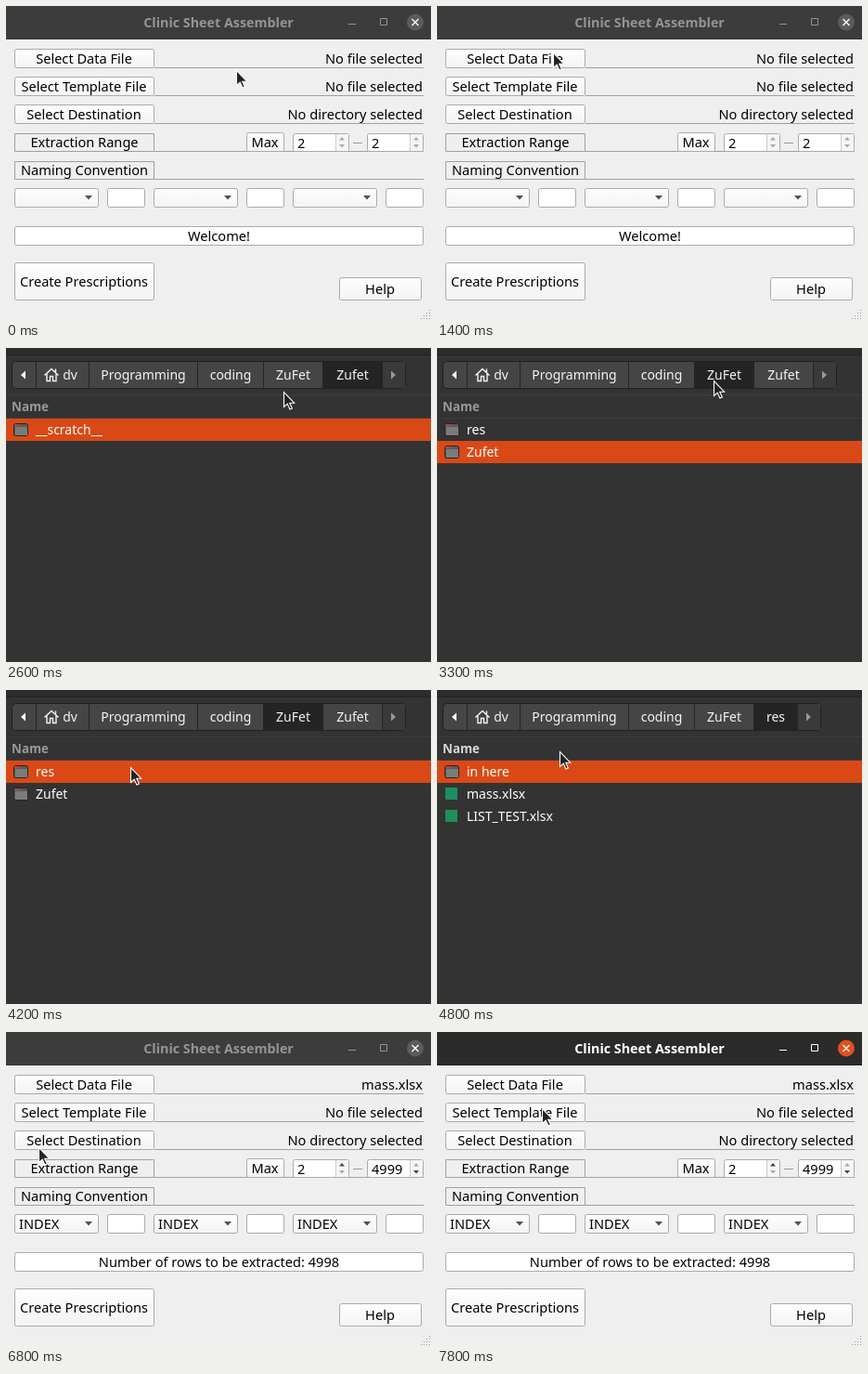
Recreate the animation shown at these times as an HTML page with a canvas. Size 458 px wide and 338 px high, loop 8 s.

```html
<!DOCTYPE html>
<html lang="en">
<head>
<meta charset="utf-8">
<title>File selection</title>
<style>
html, body { margin: 0; width: 100%; height: 100%; overflow: hidden; background: #333; }
canvas { display: block; }
</style>
</head>
<body>
<canvas id="stage" width="458" height="338"></canvas>
<script>
const ctx = document.getElementById('stage').getContext('2d');
const LOOP = 8000, STEP = 100;
const FAMILY = '"Noto Sans", sans-serif';
const UI = '14.6px ' + FAMILY, LIST = '14px ' + FAMILY;

// Pointer positions: [time, x, y]
const PATH = [
  [0, 248, 69], [400, 248, 69], [600, 178, 61], [800, 125, 50], [1500, 125, 50],
  [1600, 130, 51], [1900, 130, 51], [2200, 190, 70], [2500, 300, 56], [2800, 296, 29],
  [3200, 296, 29], [3300, 298, 35], [3700, 132, 82], [3800, 132, 82], [3900, 134, 83],
  [4400, 134, 83], [4800, 132, 66], [5100, 132, 66], [5400, 125, 121], [6400, 35, 124],
  [7000, 35, 124], [7100, 55, 124], [7200, 55, 123], [7300, 90, 98], [7400, 113, 82], [LOOP, 113, 82]
];

function pointerAt(t) {
  const i = PATH.findIndex(p => p[0] > t);
  const [t0, x0, y0] = PATH[i - 1], [t1, x1, y1] = PATH[i];
  const k = (t - t0) / (t1 - t0);
  return [Math.round(x0 + (x1 - x0) * k), Math.round(y0 + (y1 - y0) * k)];
}

function rect(x, y, w, h, color) {
  ctx.fillStyle = color;
  ctx.fillRect(x, y, w, h);
}

function text(str, x, y, color = '#000', align = 'left', font = UI) {
  ctx.font = font;
  ctx.textAlign = align;
  ctx.fillStyle = color;
  ctx.fillText(str, x, y);
}

function box(x, y, w, h, fill, stroke = '#aaa', radius = 2) {
  ctx.beginPath();
  ctx.roundRect(x + .5, y + .5, w, h, radius);
  ctx.fillStyle = fill;
  ctx.fill();
  ctx.lineWidth = 1;
  ctx.strokeStyle = stroke;
  ctx.stroke();
}

function shape(points, fill) {
  ctx.beginPath();
  points.forEach(([x, y]) => ctx.lineTo(x, y));
  ctx.closePath();
  ctx.fillStyle = fill;
  ctx.fill();
}

function stroke(d, color, width = 1) {
  ctx.lineWidth = width;
  ctx.strokeStyle = color;
  ctx.stroke(new Path2D(d));
}

function button(label, x, y, w, h, pressed) {
  const fill = ctx.createLinearGradient(0, y, 0, y + h);
  fill.addColorStop(0, pressed ? '#d2d2d2' : '#fefefe');
  fill.addColorStop(1, pressed ? '#d2d2d2' : '#f4f4f4');
  box(x, y, w, h, fill);
  if (label) text(label, x + w / 2, y + Math.round(h / 2) + 6, '#000', 'center');
}

function titleBar(active) {
  rect(0, 0, 458, 36, active ? '#2b2b2b' : '#3c3c3c');
  rect(0, 35, 458, 1, active ? '#202020' : '#333');
  const ink = active ? '#fff' : '#949494';
  text('Clinic Sheet Assembler', 229, 23, ink, 'center', 'bold 14.3px ' + FAMILY);
  rect(369, 19, 8, 1, ink);
  stroke('M403.5 13.5h7v7h-7z', ink);
  ctx.beginPath();
  ctx.arc(441, 17.5, 9, 0, 7);
  ctx.fillStyle = active ? '#e2501f' : '#5c5c5c';
  ctx.fill();
  stroke('M437.5 14l7 7m0-7l-7 7', '#fff', 1.3);
}

function spin(x, value, up, down) {
  box(x, 137, 60, 19, '#fff');
  rect(x + 47, 138, 13, 18, '#f5f5f5');
  rect(x + 46, 138, 1, 18, '#ccc');
  text(value, x + 5, 153);
  const cx = x + 53;
  shape([[cx - 3, 144.5], [cx, 141], [cx + 3, 144.5]], up ? '#444' : '#aaa');
  shape([[cx - 3, 149], [cx, 152.5], [cx + 3, 149]], down ? '#444' : '#aaa');
}

function mainWindow(t) {
  const loaded = t >= 6700;
  rect(0, 0, 458, 338, '#efefef');
  titleBar((t >= 1000 && t < 1400) || t >= 7800);

  for (let y = 66; y <= 186; y += 30) rect(160, y, 290, 1, '#a0a0a0');
  button('Select Data File', 9, 46, 150, 20, t >= 1000 && t < 1200);
  button('Select Template File', 9, 76, 150, 20);
  button('Select Destination', 9, 106, 150, 20);
  [['Extraction Range', 137], ['Naming Convention', 167]].forEach(([label, y]) => {
    box(9, y, 150, 19, '#efefef', '#a0a0a0', 0);
    text(label, 84.5, y + 15, '#000', 'center');
  });
  text(loaded ? 'mass.xlsx' : 'No file selected', 449, 62, '#000', 'right');
  text('No file selected', 449, 92, '#000', 'right');
  text('No directory selected', 449, 122, '#000', 'right');

  button('Max', 259, 136, 40, 20);
  spin(309, '2', loaded, false);
  spin(389, loaded ? '4999' : '2', false, loaded);
  rect(374, 147, 10, 1, '#999');

  for (let x = 9; x < 400; x += 150) {
    button('', x, 196, 90, 20);
    if (loaded) text('INDEX', x + 5, 212);
    shape([[x + 76, 204], [x + 84, 204], [x + 80, 208.5]], '#505050');
    box(x + 100, 196, 40, 20, '#fff');
  }
  box(9, 237, 440, 20, '#fff');
  text(loaded ? 'Number of rows to be extracted: 4998' : 'Welcome!', 229.5, 253, '#000', 'center');
  button('Create Prescriptions', 9, 276, 150, 40);
  button('Help', 359, 292, 88, 24);
  for (let i = 0; i < 4; i++)
    for (let j = 0; j <= i; j++) rect(456 - j * 3, 327 + i * 3, 1, 1, '#999');
}

function folderIcon(y) {
  box(8, y + 5, 15, 13, '#5a5a5a', '#242424');
  rect(9, y + 6, 7, 2, '#a8474a');
  rect(10, y + 9, 13, 9, '#7b7b7b');
}

function crumbs(last, lastEnd, current) {
  const edges = [32, 89, 206, 277, 341, lastEnd];
  const names = ['dv', 'Programming', 'coding', 'ZuFet', last];
  box(6, 14, lastEnd + 19, 29, '#454545', '#202020', 4);
  names.forEach((name, i) => {
    const x = edges[i], w = edges[i + 1] - x;
    if (i === current) rect(x, 15, w, 28, '#242424');
    rect(x, 15, 1, 28, '#252525');
    text(name, i ? x + w / 2 + .5 : 69, 34, '#f4f4f4', 'center', LIST);
  });
  rect(lastEnd, 15, 25, 28, '#3a3a3a');
  rect(lastEnd, 15, 1, 28, '#252525');
  shape([[16, 29], [21, 24.5], [21, 33.5]], '#fff');
  shape([[lastEnd + 15, 29], [lastEnd + 10, 24.5], [lastEnd + 10, 33.5]], '#999');
  stroke('M41.5 29.5l7.5-7 7.5 7M44 28v7.5h3.5v-5h3v5h3.5v-7.5M53.5 26v-3.5', '#f4f4f4', 1.4);
}

function dialog(t, pointerY) {
  const inRes = t >= 4500, inParent = t >= 2900;
  rect(0, 0, 458, 338, '#333');
  rect(0, 0, 458, 7, '#2c2c2c');
  rect(0, 7, 458, 1, '#222');
  rect(0, 50, 458, 1, '#3d3d3d');
  rect(0, 75, 458, 1, '#3d3d3d');
  crumbs(inRes ? 'res' : 'Zufet', inRes ? 388 : 405, inParent && !inRes ? 3 : 4);

  const overHeader = pointerY > 50 && pointerY < 76;
  text('Name', 6, 68, overHeader ? '#d6d6d6' : '#989898', 'left', 'bold 13.4px ' + FAMILY);

  let files = ['__scratch__'], selected = 0;
  if (inRes) {
    files = ['in here', 'mass.xlsx', 'LIST_TEST.xlsx'];
    selected = t >= 5400 ? 1 : 0;
  } else if (inParent) {
    files = ['res', 'Zufet'];
    selected = t >= 4200 ? 0 : 1;
  }
  files.forEach((name, i) => {
    const y = 76 + i * 24;
    if (i === selected) rect(0, y, 458, 24, '#da4915');
    if (name.endsWith('.xlsx')) rect(9, y + 5, 13, 13, '#1d8f5d');
    else folderIcon(y);
    text(name, 32, y + 17, '#fff', 'left', LIST);
  });
}

function pointer(x, y) {
  const arrow = new Path2D('M.5.5v16l3.7-3.4 2.7 6 2.5-1.1-2.7-5.8h5z');
  ctx.save();
  ctx.translate(x, y);
  ctx.fillStyle = '#222';
  ctx.fill(arrow);
  ctx.lineWidth = 1.1;
  ctx.strokeStyle = '#fff';
  ctx.stroke(arrow);
  ctx.restore();
}

function draw(now) {
  const t = Math.floor((now % LOOP) / STEP) * STEP;
  const [x, y] = pointerAt(t);
  const hidden = t >= 5500 && t < 6400;
  if (t >= 1500 && t < 6400) dialog(t, hidden ? -1 : y);
  else mainWindow(t);
  if (!hidden) pointer(x, y);
}

const start = performance.now();
function frame() {
  draw(performance.now() - start);
  requestAnimationFrame(frame);
}
frame();
</script>
</body>
</html>
```
